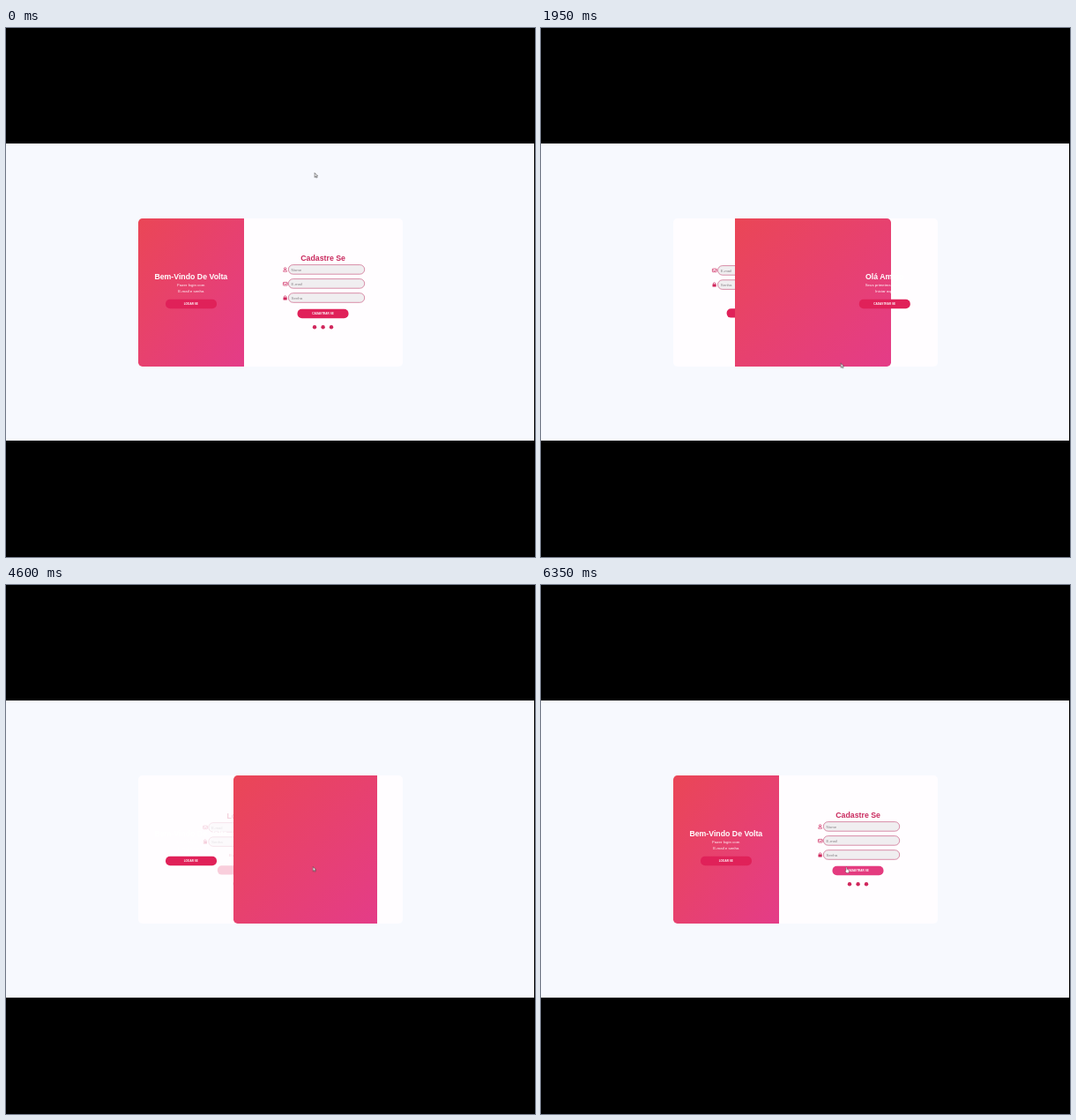
Recreate the animation shown at these times as an HTML page. Size 600 px wide and 600 px high, loop 6.4 s.

```html
<!DOCTYPE html>
<html lang="pt-BR">
<head>
<meta charset="utf-8">
<title>Cadastro e login</title>
<style>
  html, body { margin: 0; width: 100%; height: 100%; overflow: hidden; background: #000; }
  .stage { position: absolute; left: 0; top: 0; width: 600px; height: 600px; overflow: hidden; }
  .page { position: absolute; left: 0; top: 131px; width: 599.4px; height: 337.4px; background: #f7f9fe; }
  .card, .panel { position: absolute; top: 215.6px; height: 168.6px; }
  .card { left: 150px; width: 299.5px; border-radius: 4.7px; background: #fffdff; }
  .panel {
    left: 150px; width: 120px;
    background: linear-gradient(to bottom right, #ea4656, #e43c88);
    animation: slide 6.4s infinite, corners 6.4s step-end infinite;
  }
  svg { position: absolute; left: 0; top: 0; }
  text { font-family: "Liberation Sans", Arial, sans-serif; font-size: 4.375px; text-anchor: middle; }
  .title { font-size: 8.75px; font-weight: bold; }
  .form .title, .form .link { fill: #c92a5e; }
  .side { fill: #fff; }
  .field { width: 86.4px; height: 10.6px; rx: 5.3px; fill: #f0eef0; stroke: #c8557d; stroke-width: .65px; }
  .hint { text-anchor: start; fill: #858085; }
  .btn { width: 58px; height: 10.4px; rx: 5px; fill: #e02159; }
  .label { font-size: 3.125px; font-weight: bold; fill: #fff; }
  .icon { fill: none; stroke: #cf2c62; stroke-width: .7px; }
  .solid, .dot { fill: #d0265c; }

  .signup { animation: signup 6.4s infinite; }
  .login { animation: login 6.4s infinite; }
  .welcome { animation: welcome 6.4s step-end infinite; }
  .hello { animation: hello 6.4s step-end infinite; }
  .join { animation: hover-join 6.4s infinite; }
  .cursor { animation: move 6.4s ease-in-out infinite; }
  .arrow { animation: arrow 6.4s step-end infinite; }
  .hand { animation: hand 6.4s step-end infinite; }

  @keyframes slide {
    0%, 17.5% { left: 150px; width: 120px; }
    25.39% { left: 165px; width: 150px; }
    33.28% { left: 225px; width: 180px; }
    41.17% { left: 285px; width: 150px; }
    49.06%, 62.05% { left: 330px; width: 120px; }
    69.8% { left: 285px; width: 150px; }
    77.55% { left: 225px; width: 180px; }
    85.3% { left: 165px; width: 150px; }
    93.05%, 100% { left: 150px; width: 120px; }
  }
  @keyframes corners {
    0%, 62.05%, 100% { border-radius: 4.7px 0 0 4.7px; }
    17.5% { border-radius: 0 4.7px 4.7px 0; }
  }
  @keyframes signup {
    0%, 17.5% { opacity: 1; transform: none; }
    32.03% { opacity: .16; transform: translateX(-31.25px); animation-timing-function: step-end; }
    49.06% { opacity: 0; transform: translateX(-31.25px); animation-timing-function: step-end; }
    62.05%, 100% { opacity: 1; transform: none; }
  }
  @keyframes login {
    0% { opacity: 0; transform: none; animation-timing-function: step-end; }
    17.5%, 62.05% { opacity: 1; transform: none; }
    76.35% { opacity: .16; transform: translateX(31.25px); animation-timing-function: step-end; }
    93.05%, 100% { opacity: 0; transform: translateX(31.25px); }
  }
  @keyframes welcome { 0%, 62.05%, 100% { opacity: 1; } 17.5% { opacity: 0; } }
  @keyframes hello { 0%, 62.05%, 100% { opacity: 0; } 17.5% { opacity: 1; } }
  @keyframes hover-join { 0%, 80.5% { fill: #e02159; } 89%, 99.99% { fill: #e43b7f; } 100% { fill: #e02159; } }
  @keyframes move {
    0%, 3.4% { transform: translate(349.6px, 164px); }
    14.8%, 17% { transform: translate(214px, 311px); }
    21.87% { transform: translate(274px, 371.6px); }
    30.47% { transform: translate(339.6px, 379.8px); }
    33% { transform: translate(338px, 382px); }
    44.3%, 46.5% { transform: translate(242.6px, 173.6px); }
    59.5%, 62% { transform: translate(371px, 311px); }
    63.28% { transform: translate(368px, 310.8px); }
    74%, 99.99% { transform: translate(346px, 320px); }
    100% { transform: translate(349.6px, 164px); }
  }
  @keyframes arrow { 0%, 17.5%, 62.05%, 100% { opacity: 1; } 14.2%, 59%, 80.3% { opacity: 0; } }
  @keyframes hand { 0%, 17.5%, 62.05%, 100% { opacity: 0; } 14.2%, 59%, 80.3% { opacity: 1; } }
</style>
</head>
<body>
<div class="stage">
  <div class="page"></div>
  <div class="card"></div>

  <svg width="600" height="600">
    <defs>
      <g id="user" class="icon">
        <circle cy="-1.1" r="1.2"/>
        <path d="M-2 2.2c0-2.6 4-2.6 4 0z"/>
      </g>
      <g id="mail" class="icon">
        <rect x="-2.4" y="-1.8" width="4.8" height="3.6" rx=".5"/>
        <path d="M-2.3-.8 0 .8 2.3-.8"/>
      </g>
      <g id="lock">
        <path class="icon" d="M-1.2 0v-1.1a1.2 1.2 0 0 1 2.4 0V0"/>
        <rect class="solid" x="-2.1" y="-.4" width="4.2" height="2.9" rx=".5"/>
      </g>
      <g id="social" class="dot">
        <circle cx="-9.6" r="2.2"/>
        <circle r="2.2"/>
        <circle cx="9.4" r="2.2"/>
      </g>
    </defs>

    <g class="form signup">
      <text class="title" x="359.6" y="264.2">Cadastre Se</text>
      <use href="#user" x="316.6" y="274"/>
      <use href="#mail" x="316.8" y="290.2"/>
      <use href="#lock" x="316.6" y="306"/>
      <rect class="field" x="320.3" y="268.6"/>
      <rect class="field" x="320.3" y="284.6"/>
      <rect class="field" x="320.3" y="300.7"/>
      <text class="hint" x="323.6" y="275.5">Nome</text>
      <text class="hint" x="323.6" y="291.5">E-mail</text>
      <text class="hint" x="323.6" y="307.5">Senha</text>
      <rect class="btn join" x="330.5" y="318.8"/>
      <text class="label" x="359.5" y="325.1">CADASTRAR SE</text>
      <use href="#social" x="359.6" y="339.3"/>
    </g>

    <g class="form login">
      <text class="title" x="239.9" y="265">Logar Se</text>
      <use href="#mail" x="196.8" y="274.9"/>
      <use href="#lock" x="196.6" y="291"/>
      <rect class="field" x="200.5" y="269.6"/>
      <rect class="field" x="200.5" y="285.8"/>
      <text class="hint" x="203.8" y="276.5">E-mail</text>
      <text class="hint" x="203.8" y="292.6">Senha</text>
      <text class="link" x="239.9" y="307.8">Esqueci a senha</text>
      <rect class="btn" x="210.6" y="318.2"/>
      <text class="label" x="239.6" y="324.5">LOGAR SE</text>
      <use href="#social" x="239.8" y="338.8"/>
    </g>
  </svg>

  <div class="panel"></div>

  <svg width="600" height="600">
    <g class="side welcome">
      <text class="title" x="209.8" y="285.1">Bem-Vindo De Volta</text>
      <text x="209.8" y="292.5">Fazer login com</text>
      <text x="209.8" y="300.3">E-mail e senha</text>
      <rect class="btn" x="181" y="307.8"/>
      <text class="label" x="209.8" y="314.1">LOGAR SE</text>
    </g>
    <g class="side hello">
      <text class="title" x="389.7" y="285.1">Olá Amigo</text>
      <text x="389.7" y="292.5">Seus primeiros passos</text>
      <text x="389.7" y="300.3">Iniciar aqui</text>
      <rect class="btn" x="360.8" y="307.8"/>
      <text class="label" x="389.7" y="314.1">CADASTRAR SE</text>
    </g>
    <g class="cursor" fill="#fff" stroke="#333" stroke-width=".6" stroke-linejoin="round">
      <path class="arrow" d="M.3.3v5L1.5 4.2l.8 1.8.9-.4-.8-1.7H4z"/>
      <path class="hand" stroke-width=".35" d="M-.1.5q.5-.8 1 0v2l1.9.5q.7.2.6.9L3 6.6H.5L-1 4.3q.1-.7.9-.2z"/>
    </g>
  </svg>
</div>
</body>
</html>
```
